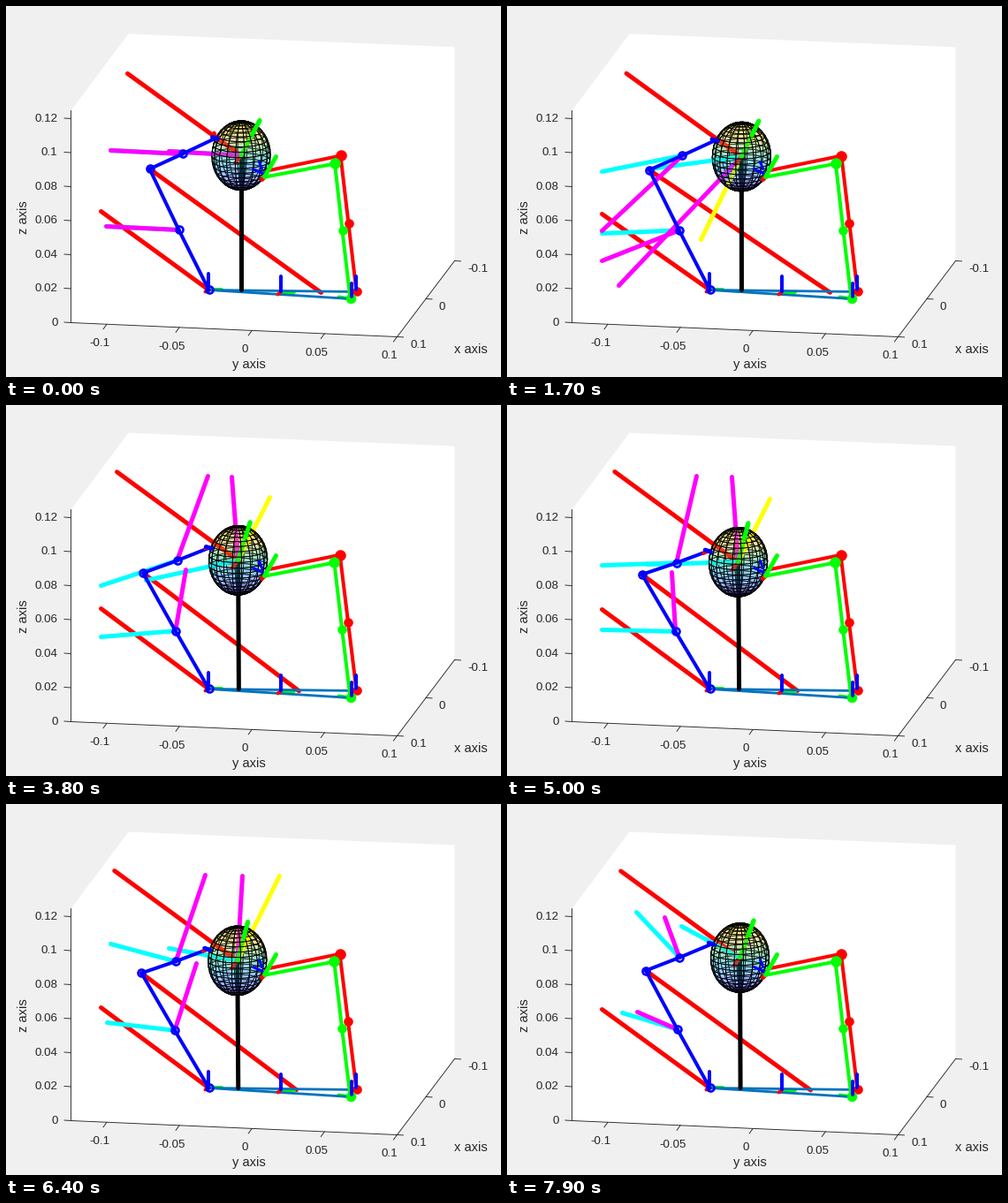
Write a matplotlib script that moves like this. It is 560 px wide and 420 px high and loops after 8 s.

```python
import numpy as np
import matplotlib.pyplot as plt
from matplotlib.animation import FuncAnimation
from matplotlib.collections import PolyCollection
from matplotlib.colors import LinearSegmentedColormap

W, H, DPI = 560, 420, 100
PX = 72 / DPI
STEP, FRAMES, HOLD = 100, 80, 4
INK = "#262626"
RED, GREEN, BLUE = "#ff0000", "#00ff00", "#0000ff"

plt.rcParams["font.family"] = "Liberation Sans"
fig = plt.figure(figsize=(W / DPI, H / DPI), dpi=DPI, facecolor="#f0f0f0")
ax = fig.add_axes([0, 0, 1, 1])
ax.set_xlim(-0.5, W - 0.5)
ax.set_ylim(H - 0.5, -0.5)
ax.axis("off")


def line(pts, color, width, z):
    x, y = zip(*pts)
    return ax.plot(x, y, color=color, lw=width * PX, zorder=z,
                   solid_capstyle="round", solid_joinstyle="round")[0]


def dot(x, y, color, size, z, hollow=False):
    return ax.plot([x], [y], "o", ms=size * PX, mec=color, zorder=z,
                   mfc="none" if hollow else color,
                   mew=(2.6 if hollow else 0.5) * PX)[0]


def text(x, y, s, ha="center", size=13.33, rot=0):
    ax.text(x, y, s, ha=ha, va="center", fontsize=size * PX, color=INK,
            rotation=rot)


# Axes box
ax.fill([138, 507, 507, 442, 73, 73], [31, 46, 288, 374, 358, 118],
        color="white", lw=0, zorder=0)


def rule(*pts):
    ax.plot(*zip(*pts), color=INK, lw=0.9 * PX, zorder=1)


rule((73, 118), (73, 358), (442, 374), (507, 288))
for i, s in enumerate(["0", "0.02", "0.04", "0.06", "0.08", "0.1", "0.12"]):
    y = 358 - 38.5 * i
    rule((73, y), (65.5, y - 0.5))
    text(58, y + 0.5, s, "right")
for i, s in enumerate(["-0.1", "-0.05", "0", "0.05", "0.1"]):
    x, y = 113.5 + 82.1 * i, 359.8 + 3.55 * i
    rule((x, y), (x - 4, y + 5.5))
    text(x - 8.5, y + 22, s)
for i, s in enumerate(["0.1", "0", "-0.1"]):
    x, y = 442 + 32.5 * i, 374 - 43 * i
    rule((x, y), (x + 7, y + 0.4))
    text(x + 14.5, y + 9.5, s, "left")
text(274, 406, "y axis", size=14.67)
text(525, 389, "x axis", size=14.67)
text(20, 239, "z axis", size=14.67, rot=90)

# Base plate with its joint frames
line([(229, 321), (396, 323)], "#0072bd", 2.8, 4)
line([(229, 321), (389, 331)], "#0072bd", 2.8, 4)
for x, y in [(228, 321), (310, 324)]:
    line([(x, y), (x - 3, y + 2)], RED, 4, 5)
    line([(x + 2, y), (x + 15, y)], GREEN, 4, 3.5)
    line([(x, y - 1), (x, y - 18)], BLUE, 4, 9)
line([(376, 329), (389, 331)], GREEN, 4, 3.5)
line([(395.5, 321), (395.5, 306)], BLUE, 4, 9)
line([(390, 329), (390, 314)], BLUE, 4, 9)

# Right fingers
red_arm = line([(0, 0)] * 4, RED, 4, 6)
green_arm = line([(0, 0)] * 4, GREEN, 4, 6)
red_dots = [dot(0, 0, RED, s, 7) for s in (10, 10, 12)]
green_dots = [dot(0, 0, GREEN, s, 7) for s in (11, 10, 12)]
line([(279, 184), (290, 189)], BLUE, 3, 6)
line([(286, 176), (289, 184)], BLUE, 3, 6)
line([(292, 193), (289, 196)], RED, 5, 8)
line([(292, 193), (305, 170)], GREEN, 5, 8)

# Ball mesh, projected from a unit sphere
stops = ["#3e26a8", "#4757f7", "#2796eb", "#12bdb9", "#80cb58", "#fdbe3c",
         "#f9fb14"]
cmap = LinearSegmentedColormap.from_list("ball", stops)
lon, lat = np.meshgrid(np.linspace(-np.pi, np.pi, 21),
                       np.linspace(-np.pi / 2, np.pi / 2, 21))
xyz = np.stack([np.cos(lat) * np.cos(lon), np.cos(lat) * np.sin(lon),
                np.sin(lat)], axis=-1)
right, down = np.array([-6.5, 32.8, 0]), np.array([8.6, 1.42, -38.5])
flat = np.stack([xyz @ right, xyz @ down], axis=-1)


def corners(a):
    return np.stack([a[:-1, :-1], a[:-1, 1:], a[1:, 1:], a[1:, :-1]],
                    axis=2).reshape(400, 4, -1)


quads, mids = corners(flat), corners(xyz).mean(axis=1)
near = mids @ np.cross(right, -down) > 0
shells = []
for mask, z in [(~near, 2), (near, 5)]:
    face = cmap((mids[mask, 2] + 1) / 2)
    face[:, 3] = 0.27
    shell = PolyCollection(quads[mask], facecolors=face, edgecolors="black",
                           linewidths=0.8 * PX, zorder=z)
    ax.add_collection(shell)
    shells.append((shell, quads[mask]))

# Moving parts
rod = line([(0, 0)] * 2, "black", 5, 4)
pulls = [line([(0, 0)] * 2, RED, 5, 3) for _ in range(3)]
ball_x = line([(0, 0)] * 2, RED, 4, 4.5)
ball_y = line([(0, 0)] * 2, GREEN, 5, 4.5)
ball_y_tip = line([(0, 0)] * 2, GREEN, 5, 6)
blue_arm = line([(0, 0)] * 4, BLUE, 4, 6)
blue_dots = [dot(0, 0, BLUE, 8, 7, True) for _ in range(4)]
tip_x = line([(0, 0)] * 2, RED, 4, 7)
tip_z = line([(0, 0)] * 2, BLUE, 5, 7)

KEYS = np.array([0, 13, 23, 34, 46, 60, 75])
BASE_X = [356, 365, 350, 331, 328, 328, 343]
LOW_Y = [232, 235, 234, 230, 231, 230, 232]

# colour, origin, tip x, tip y at the key steps
FORCES = [
    ("#00ffff", "ball", [184, 161, 168, 158, 158, 184, 197],
     [164, 184, 199, 198, 180, 163, 138]),
    ("#00ffff", "upper", [118, 107, 107, 107, 107, 118, 146],
     [163, 187, 205, 204, 181, 158, 122]),
    ("#00ffff", "lower", [113, 107, 107, 107, 107, 114, 130],
     [249, 257, 263, 262, 254, 247, 236]),
    ("#ff00ff", "ball", [184, 126, 152, 255, 254, 267, 263],
     [164, 316, 228, 81, 81, 81, 172]),
    ("#ff00ff", "upper", [118, 107, 107, 228, 214, 225, 178],
     [163, 254, 240, 80, 80, 80, 128]),
    ("#ff00ff", "lower", [113, 107, 107, 203, 186, 215, 147],
     [249, 288, 273, 186, 189, 180, 235]),
    ("#ffff00", "ball", [265, 219, 264, 298, 297, 309, 263],
     [169, 264, 172, 104, 106, 81, 173]),
]
arrows = [line([(0, 0)] * 2, f[0], 5, 3.2 + 0.02 * i)
          for i, f in enumerate(FORCES)]


def ease(vals, s):
    """Smooth curve through the key values without overshoot."""
    v = np.array(vals, float)
    h = np.diff(KEYS)
    d = np.diff(v) / h
    m = np.zeros(len(v))
    same = d[:-1] * d[1:] > 0
    m[1:-1][same] = 2 * d[:-1][same] * d[1:][same] / (d[:-1] + d[1:])[same]
    m[0], m[-1] = d[0], d[-1]
    i = min(np.searchsorted(KEYS, s, "right") - 1, len(h) - 1)
    t = (s - KEYS[i]) / h[i]
    return ((1 + 2 * t) * (1 - t) ** 2 * v[i] + t * t * (3 - 2 * t) * v[i + 1]
            + h[i] * t * (1 - t) * ((1 - t) * m[i] - t * m[i + 1]))


def place(art, *pts):
    art.set_data(*zip(*pts))


def draw(n):
    s = max(0, n - HOLD)
    p = (1 - np.cos(2 * np.pi * s / 102)) / 2

    def at(x, y, dx, dy):
        return np.array([x + dx * p, y + dy * p])

    ball = at(265.5, 168.7, -4.5, 8.8)
    elbow = at(162, 184, -10, 7.5)
    upper = at(199, 167, -8, 11.5)
    lower = at(195, 253, -5, 3)
    tip = at(237, 149, -9.5, 16)
    foot = np.array([229, 321])
    spots = {"ball": ball, "upper": upper, "lower": lower}

    for shell, verts in shells:
        shell.set_verts(verts + ball)
    place(rod, ball, at(265.5, 321, -3.5, 0))
    place(pulls[0], at(137, 76, -16, -1), ball + [1, 1])
    place(pulls[1], elbow, (ease(BASE_X, s), 324 - p))
    place(pulls[2], (107, ease(LOW_Y, s)), foot)

    head = at(286.5, 129, -14.5, 4.5)
    place(ball_x, ball, ball + [-7, 9])
    place(ball_y, ball, head)
    place(ball_y_tip, ball + 0.6 * (head - ball), head)

    place(blue_arm, foot, lower, elbow, upper, tip)
    for d, pt in zip(blue_dots, (foot, lower, elbow, upper)):
        place(d, pt)
    place(tip_x, tip, tip + [-2 - 4 * p, -6 + 9 * p])
    place(tip_z, tip + [-4, -1], tip + [2, 1])

    red = [(396, 323), at(387, 246, -0.5, 0), at(378, 169, -1, 0.3)]
    green = [(389, 331), at(380, 254, -0.4, 0), at(371.5, 178, -0.8, 0)]
    place(red_arm, *red, (295, 186))
    place(green_arm, *green, (293, 193))
    for d, pt in zip(red_dots + green_dots, red + green):
        place(d, pt)

    for art, (_, origin, xs, ys) in zip(arrows, FORCES):
        start = spots[origin]
        end = np.array([ease(xs, s), ease(ys, s)])
        art.set_visible(np.hypot(*(end - start)) > 3)
        place(art, start, end)
    return []


anim = FuncAnimation(fig, draw, frames=FRAMES, interval=STEP,
                     init_func=lambda: draw(0), repeat=True, repeat_delay=0,
                     blit=False)
plt.show()
```
